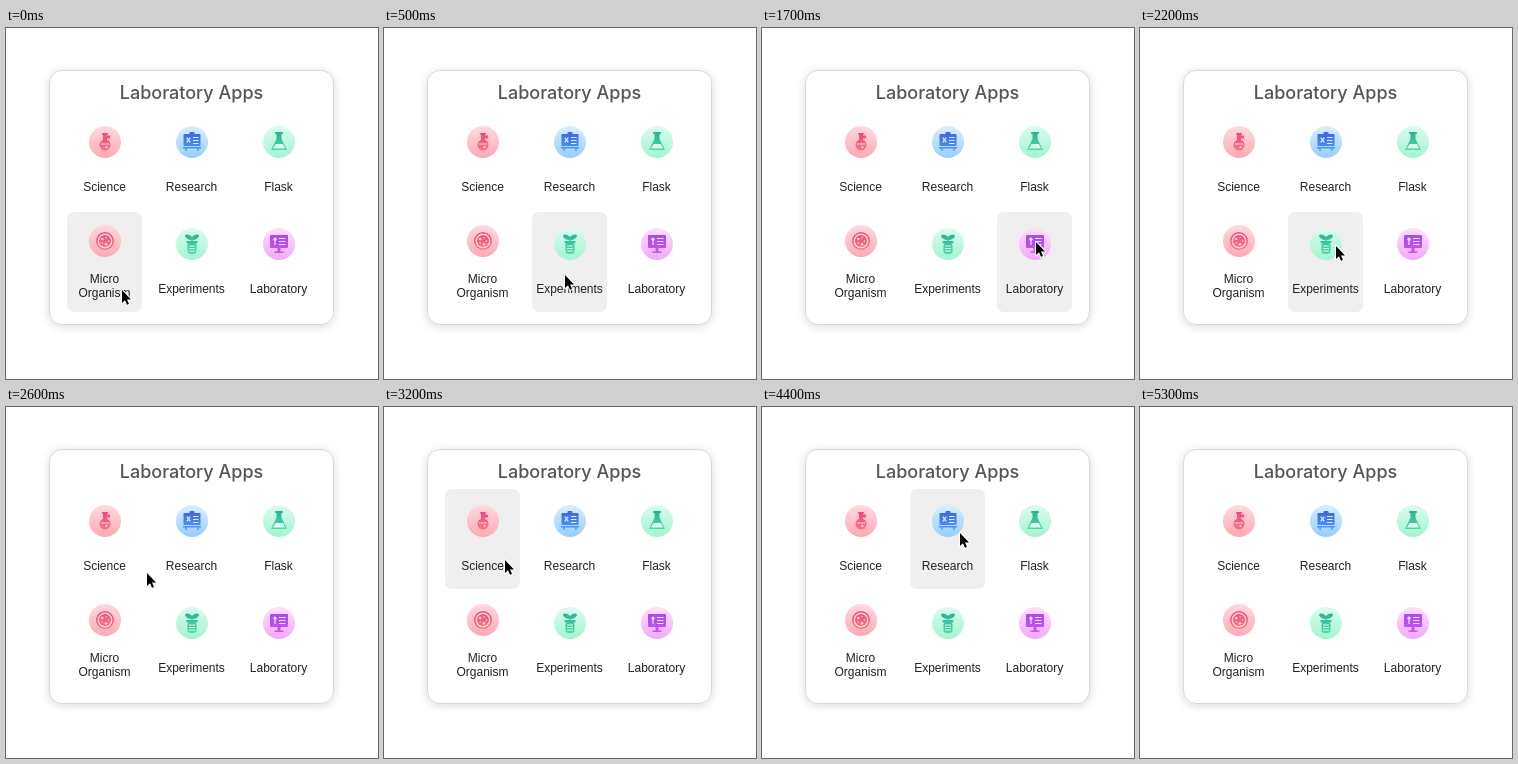
Recreate the animation shown at these times as an HTML page with a canvas. Size 372 px wide and 351 px high, loop 6000 ms.

```html
<!DOCTYPE html>
<html lang="en">
<head>
<meta charset="utf-8">
<title>Laboratory Apps</title>
<style>
html, body { margin: 0; width: 100%; height: 100%; overflow: hidden; background: #fff; }
canvas { display: block; width: 372px; height: 351px; }
</style>
</head>
<body>
<canvas id="stage"></canvas>
<script>
const W = 372, H = 351, LOOP = 6000, STEP = 100;
const CELL = { x: 61, y: 82, w: 75, h: 100, dx: 87, dy: 102 };
const canvas = document.getElementById('stage');
const ctx = canvas.getContext('2d');
const dpr = window.devicePixelRatio || 1;
canvas.width = W * dpr;
canvas.height = H * dpr;

const linear = p => p;
const smooth = p => p < 0.5 ? 4 * p ** 3 : 1 - 4 * (1 - p) ** 3;
const easeIn = p => p * p;
const easeOut = p => 1 - (1 - p) ** 2;

// Each glide leaves the previous resting point and ends at x, y
const home = { x: 115, y: 261 };
const glides = [
  { from: 200, to: 500, x: 180, y: 246, ease: smooth },
  { from: 600, to: 1100, x: 175, y: 140, ease: easeIn },
  { from: 1100, to: 1300, x: 276, y: 133, ease: easeOut },
  { from: 1600, to: 1700, x: 273, y: 213, ease: linear },
  { from: 1700, to: 2200, x: 195, y: 217, ease: smooth },
  { from: 2300, to: 2800, x: 121, y: 147, ease: smooth },
  { from: 3100, to: 3500, x: 102, y: 229, ease: smooth },
  { from: 4000, to: 4400, x: 197, y: 125, ease: smooth },
  { from: 4700, to: 5000, x: 190, y: -30, ease: easeIn }
];

function pointerAt(t) {
  let { x, y } = home;
  for (const g of glides) {
    if (t <= g.from) break;
    const k = g.ease(Math.min(1, (t - g.from) / (g.to - g.from)));
    x += (g.x - x) * k;
    y += (g.y - y) * k;
  }
  return { x: Math.round(x), y: Math.round(y) };
}

function vertical(r, top, bottom) {
  const g = ctx.createLinearGradient(0, -r, 0, r);
  g.addColorStop(0, top);
  g.addColorStop(1, bottom);
  return g;
}

function box(x, y, w, h, r = 0) {
  ctx.beginPath();
  ctx.roundRect(x, y, w, h, r);
  ctx.fill();
}

// A box centred on the vertical axis
const bar = (y, w, h, r) => box(-w / 2, y, w, h, r);

function disc(x, y, r) {
  ctx.beginPath();
  ctx.arc(x, y, r, 0, Math.PI * 2);
  ctx.fill();
}

function polygon(...points) {
  ctx.beginPath();
  points.forEach(([x, y]) => ctx.lineTo(x, y));
  ctx.fill();
}

function rows(x, y, w, count, gap) {
  for (let i = 0; i < count; i++) box(x, y + i * gap, w, 1);
}

// Glyphs are drawn around the centre of their disc
function science(light) {
  bar(-9, 6, 2, 1);
  bar(-7, 4, 8);
  disc(0, 3, 5.5);
  disc(3.5, -5, 1.8);
  ctx.fillStyle = light;
  bar(1.5, 8, 1);
  disc(1.5, 5, 1);
}

function research(light) {
  bar(-10, 5, 3, 1);
  bar(-8, 17, 12, 1);
  bar(5, 18, 1.5);
  for (const side of [-1, 1]) box(side * 6 - 0.7, 6, 1.4, 3);
  ctx.fillStyle = light;
  rows(1, -5, 5.5, 3, 3);
  for (const turn of [-1, 1]) {
    ctx.save();
    ctx.translate(-3.5, -2);
    ctx.rotate(turn * 0.6);
    bar(-3, 1.3, 6);
    ctx.restore();
  }
}

function flask(light) {
  bar(-10, 8, 2, 0.8);
  bar(-8, 5, 6);
  polygon([-2.5, -3], [2.5, -3], [8, 8], [-8, 8]);
  ctx.fillStyle = light;
  polygon([-3.5, 2], [4, 2], [6, 6.5], [-6, 6.5]);
}

function dish(light) {
  disc(0, 0, 9);
  ctx.fillStyle = light;
  disc(0, 0, 7.4);
  ctx.fillStyle = ctx.strokeStyle;
  disc(0, 0, 6);
  ctx.fillStyle = light;
  for (let i = 0; i < 5; i++) {
    const a = i * Math.PI * 0.4;
    disc(3.4 * Math.cos(a), 3.4 * Math.sin(a), 0.8 + (i % 2) * 0.5);
  }
}

function plant(light) {
  for (const side of [-1, 1]) {
    ctx.beginPath();
    ctx.ellipse(side * 3.3, -6.8, 3.9, 2.1, side * -0.5, 0, Math.PI * 2);
    ctx.fill();
  }
  bar(-6, 1.4, 4);
  bar(-3, 11, 2.6, 0.8);
  bar(-1, 9, 11, 3);
  ctx.fillStyle = light;
  rows(-3, 1.5, 6, 3, 2.5);
}

function monitor(light) {
  bar(-9, 18, 13, 1);
  bar(4, 3, 4);
  bar(7.5, 9, 1.5);
  ctx.fillStyle = light;
  disc(-4, -4.8, 1.6);
  box(-4.6, -5, 1.2, 6);
  rows(0, -6, 6.5, 3, 3);
}

// Disc top, disc bottom, glyph top, glyph bottom
const rose = ['#ffd9de', '#fdaab4', '#ec4580', '#fa7a80'];
const sky = ['#d8efff', '#98ceff', '#3d63e4', '#4c9ef6'];
const mint = ['#dbfcf0', '#a2f4d0', '#2bb096', '#4cdcaa'];
const lilac = ['#fde0ff', '#f2a8fb', '#a64aee', '#c755f2'];

const apps = [
  { label: ['Science'], glyph: science, tint: rose },
  { label: ['Research'], glyph: research, tint: sky },
  { label: ['Flask'], glyph: flask, tint: mint },
  { label: ['Micro', 'Organism'], glyph: dish, tint: rose },
  { label: ['Experiments'], glyph: plant, tint: mint },
  { label: ['Laboratory'], glyph: monitor, tint: lilac }
];

function drawCard() {
  ctx.save();
  ctx.shadowColor = 'rgba(0,0,0,0.15)';
  ctx.shadowBlur = 10 * dpr;
  ctx.shadowOffsetY = 1.5 * dpr;
  ctx.fillStyle = '#fff';
  box(43, 42, 285, 255, 13);
  ctx.restore();
  ctx.strokeStyle = '#d8d8d8';
  ctx.lineWidth = 1;
  ctx.beginPath();
  ctx.roundRect(43.5, 42.5, 284, 254, 12.5);
  ctx.stroke();
  ctx.fillStyle = '#555';
  ctx.font = '500 18px Inter, sans-serif';
  ctx.fillText('Laboratory Apps', 185.5, 71);
}

function drawApp({ label, glyph, tint }, i, pointer) {
  const x = CELL.x + (i % 3) * CELL.dx;
  const y = CELL.y + Math.floor(i / 3) * CELL.dy;
  const inX = pointer.x >= x && pointer.x < x + CELL.w;
  const inY = pointer.y >= y && pointer.y < y + CELL.h;
  if (inX && inY) {
    ctx.fillStyle = '#efefef';
    box(x, y, CELL.w, CELL.h, 7);
  }

  const two = label.length > 1;
  const [pale, full, top, bottom] = tint;
  ctx.save();
  ctx.translate(x + 38, y + (two ? 29 : 32));
  ctx.fillStyle = vertical(16, pale, full);
  disc(0, 0, 16);
  ctx.fillStyle = ctx.strokeStyle = vertical(10, top, bottom);
  glyph(pale);
  ctx.restore();

  ctx.fillStyle = '#222';
  ctx.font = '12px "Liberation Sans", Arial, sans-serif';
  label.forEach((text, n) =>
    ctx.fillText(text, x + 37.5, y + (two ? 71 : 81) + n * 14));
}

const arrow = new Path2D('M1 1V14L4 11.2 6 15.8 8 15 6 10.4H10Z');

function drawPointer({ x, y }) {
  ctx.save();
  ctx.translate(x, y);
  ctx.lineJoin = 'round';
  ctx.strokeStyle = '#fff';
  ctx.lineWidth = 2;
  ctx.stroke(arrow);
  ctx.fillStyle = '#000';
  ctx.fill(arrow);
  ctx.restore();
}

function draw(now) {
  const t = Math.floor((now % LOOP) / STEP) * STEP;
  const pointer = pointerAt(t);
  ctx.setTransform(dpr, 0, 0, dpr, 0, 0);
  ctx.fillStyle = '#fff';
  ctx.fillRect(0, 0, W, H);
  ctx.textAlign = 'center';
  drawCard();
  apps.forEach((app, i) => drawApp(app, i, pointer));
  drawPointer(pointer);
}

const start = performance.now();
function tick() {
  draw(performance.now() - start);
  requestAnimationFrame(tick);
}
tick();
</script>
</body>
</html>
```
